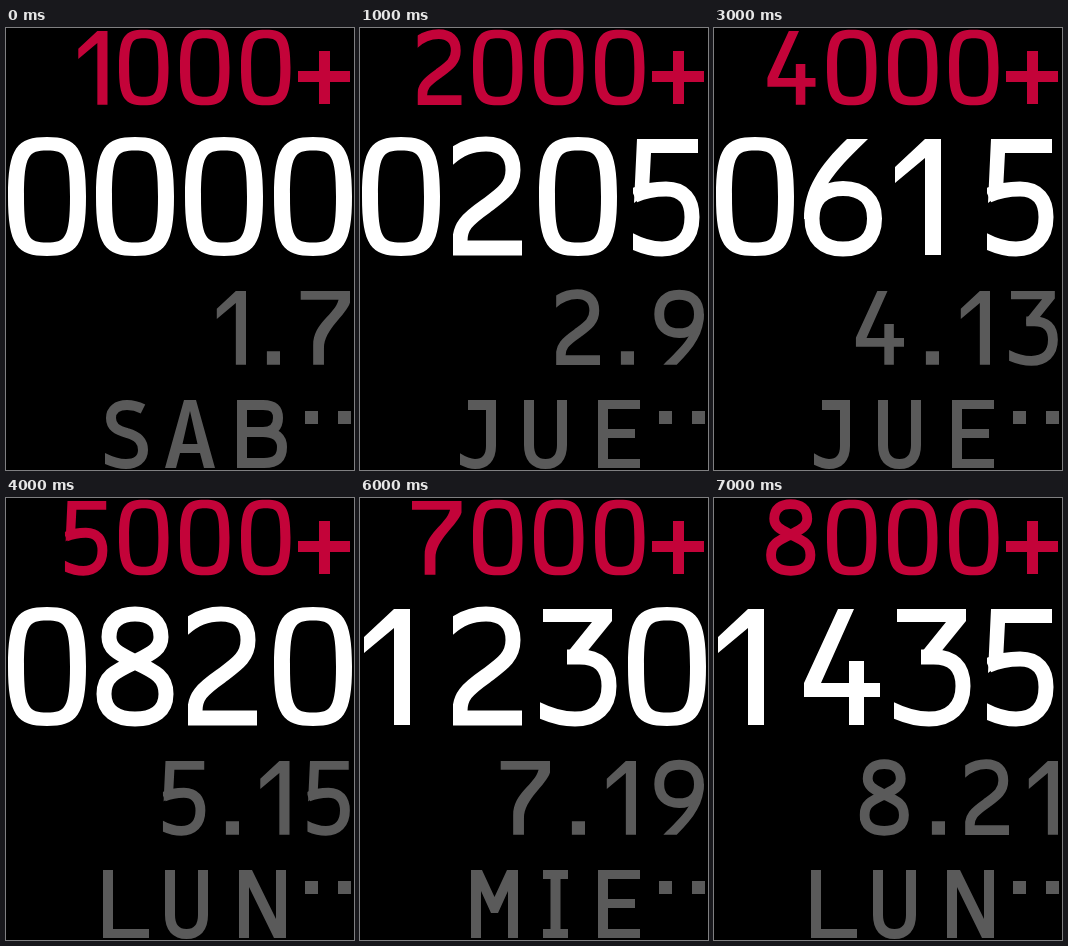
These frames come from a looping animation (348x442 px, 8000 ms). An HTML page:

```html
<!DOCTYPE html>
<html lang="es">
<head>
<meta charset="utf-8">
<title>Counter</title>
<style>
html, body { margin: 0; width: 100%; height: 100%; overflow: hidden; background: #000; }
#stage { display: block; width: 348px; height: 442px; }
</style>
</head>
<body>
<svg id="stage" viewBox="0 0 348 442" role="img"></svg>
<script>
const RED = '#c30339', WHITE = '#fff', GREY = '#5a5a5a';
const SMALL = 0.635;
const STEP = 1000, COUNT = 8;

// Each glyph: w = right edge, f = filled outline, s = centre line,
// cut = left edge where curved ends are trimmed upright.
// Digits are drawn on a 78 x 119 cell.
const SIX = {
  w: 78,
  f: 'M43 2H64C34 31 20 46 15 70L8 82H0C0 52 15 29 43 2Z',
  s: 'M39 51.5C59 51.5 70.5 63 70.5 81.5C70.5 101 59 112 39 112C19 112 8 101 8 81.5C8 63 19 51.5 39 51.5Z'
};
const DIGITS = {
  0: { w: 78, f: 'M39 0C69 0 78 11 78 59.5C78 108 69 119 39 119C9 119 0 108 0 59.5C0 11 9 0 39 0Z' +
                 'M39 13.5C57 13.5 62 18 62 59.5C62 101 57 105.5 39 105.5C21 105.5 16 101 16 59.5C16 18 21 13.5 39 13.5Z' },
  1: { w: 48, f: 'M32 2H48V118H32V21L2 46V30Z' },
  2: { w: 72, cut: 3, s: 'M-4 24C10 11 22 7 36 7C53 7 63 16 63 33C63 50 52 57 36 69C16 83 10 90 10 104V111H72' },
  3: { w: 78, cut: 1, f: 'M4 2H73V14L47 46L28 55V46L53 15H4Z',
       s: 'M28 50H38C60 49 70 60 70 79C70 100 57 112 36 112C22 112 9 108 -6 100' },
  4: { w: 76, f: 'M34 2H50L17 76H45V54H60V76H76V90H60V118H45V90H0V76Z' },
  5: { w: 72, cut: 5, f: 'M9 2H70V16H23L21 54L6 66Z',
       s: 'M6 58.5C18 53 28 52 38 52C56 52 64 63 64 80C64 101 52 112 34 112C22 112 12 109 -2 101' },
  6: SIX,
  7: { w: 78, f: 'M0 2H78V20C72 40 37 62 37 92V118H20V88C20 52 54 40 60 16H0Z' },
  8: { w: 78, s: 'M39 55C22 46 13 42 13 30C13 14 24 7 39 7C54 7 65 14 65 30C65 42 56 46 39 55' +
                 'C18 65 8 70 8 87C8 104 20 112 39 112C58 112 70 104 70 87C70 70 60 65 39 55Z' },
  9: { ...SIX, turn: 'rotate(180 39 60)' },
  '.': { w: 21, f: 'M0 97H21V118H0Z' }
};

const LETTERS = {
  S: { s: 'M38 10C34 8 28 6 22 6C12 6 6 11 6 19C6 28 12 31 22 34C33 37 38 42 38 51C38 60 31 65 21 65C13 65 6 63 -5 57' },
  A: { f: 'M19 1H31L50 69H39L35 54H15L11 69H0ZM25 12L17.5 45H32.5Z' },
  B: { s: 'M26 33C39 33 45 39 45 48C45 59 39 64 27 64H5V6H26C38 6 41 12 41 19C41 28 36 33 26 33H5' },
  L: { f: 'M0 1H10V60H46V69H0Z' },
  U: { s: 'M5 1V46C5 59 11 65 21.5 65C32 65 38 59 38 46V1' },
  N: { f: 'M0 1H13L37 50V1H47V69H35L10 18V69H0Z' },
  M: { f: 'M0 1H11L23.5 28L36 1H47V69H37V22L27 44H20L10 22V69H0Z' },
  I: { f: 'M0 1H25V10H17.5V60H25V69H0V60H7.5V10H0Z' },
  E: { f: 'M0 1H42V10H10V30H37V39H10V60H42V69H0Z' },
  J: { s: 'M8 6H31V47C31 59 25 65 15 65C9 65 4 63 -5 57' }
};

const DAYS = ['SAB', 'JUE', 'SAB', 'JUE', 'LUN', 'SAB', 'MIE', 'LUN'];
const DAY_X = { SAB: [99, 159, 231], JUE: [100, 164, 238], LUN: [97, 159, 233], MIE: [111, 183, 238] };

// Right edges of the date characters, one row per month.
const DATE_X = [
  [240, 274, 344], [240, 274, 344], [211, 245, 295, 344], [190, 225, 276, 344],
  [199.5, 233, 283.5, 344], [190, 225, 276, 344], [190, 225, 276, 344], [195, 231, 295, 344]
];

const stage = document.getElementById('stage');

function glyph(g, x, y, scale, color, weight) {
  const cut = g.cut || 0;
  const fill = g.f ? `<path d="${g.f}" fill="${color}" fill-rule="evenodd"/>` : '';
  const line = g.s ? `<path d="${g.s}" fill="none" stroke="${color}" stroke-width="${weight}"/>` : '';
  return `<g transform="translate(${x} ${y}) scale(${scale}) ${g.turn || ''}">
    <svg x="${cut}" y="-1" width="90" height="122" viewBox="${cut} -1 90 122" overflow="hidden">${fill}${line}</svg></g>`;
}

const bigDigit = (c, i) => glyph(DIGITS[c], Math.floor(2 + i * 88.7), 109, 1, WHITE, 15);

function smallDigit(c, right, y, color) {
  const g = DIGITS[c];
  return glyph(g, right - g.w * SMALL, y, SMALL, color, 15.5);
}

const rect = (x, y, w, h, color) =>
  `<rect x="${x}" y="${y}" width="${w}" height="${h}" fill="${color}"/>`;

function draw(i) {
  const n = i + 1;
  const steps = String(n * 1000);
  const time = String(i * 205).padStart(4, '0');
  const date = `${n}.${2 * n + 5}`;
  const day = DAYS[i];

  stage.setAttribute('aria-label', `${steps}+ ${time} ${date} ${day}`);
  stage.innerHTML =
    [...steps].map((c, k) => smallDigit(c, 101.5 + k * 61, 1.7, RED)).join('') +
    rect(292, 43, 52, 11, RED) + rect(313, 23, 11, 53, RED) +
    [...time].map(bigDigit).join('') +
    [...date].map((c, k) => smallDigit(c, DATE_X[i][k], 261.7, GREY)).join('') +
    [...day].map((c, k) => glyph(LETTERS[c], DAY_X[day][k], 371, 1, GREY, 10)).join('') +
    rect(299, 383, 13, 13, GREY) + rect(332, 383, 13, 13, GREY);
}

const start = performance.now();
let shown = -1;

function tick() {
  const i = Math.floor((performance.now() - start) / STEP) % COUNT;
  if (i !== shown) draw(shown = i);
  requestAnimationFrame(tick);
}
tick();
</script>
</body>
</html>
```
